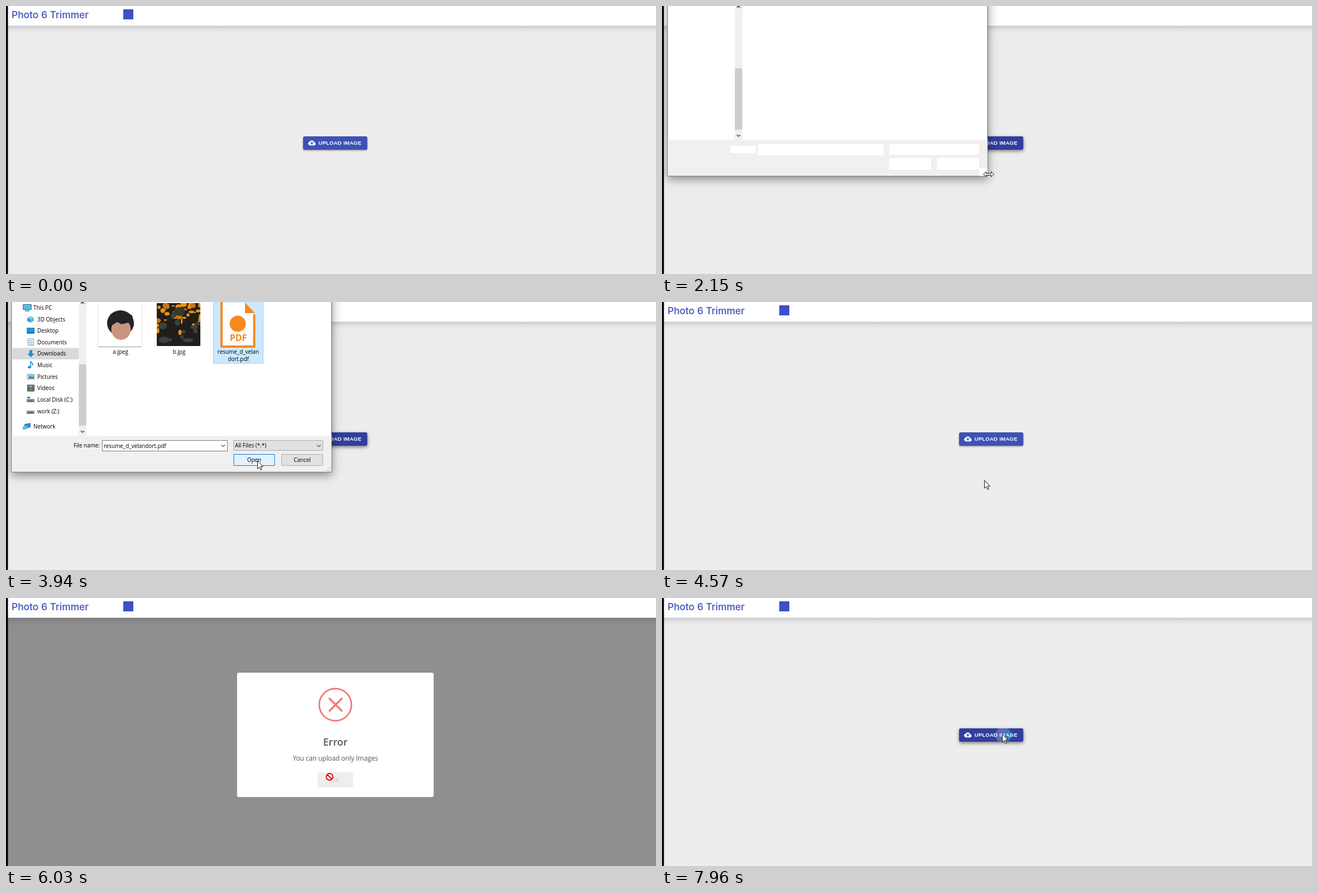
Animation, 1164 px wide and 481 px high, one loop 8000 ms. Source, as an HTML page with a canvas:

```html
<!DOCTYPE html>
<html lang="en">
<head>
<meta charset="utf-8">
<title>Image upload</title>
<style>
html, body { margin: 0; width: 100%; height: 100%; overflow: hidden; background: #ededed; }
canvas { display: block; width: 1164px; height: 481px; }
</style>
</head>
<body>
<canvas id="stage" width="1164" height="481"></canvas>
<script>
const W = 1164, H = 481, LOOP = 8000;
const g = document.getElementById('stage').getContext('2d');
const UI = '"Open Sans", "Noto Sans", sans-serif';
const FILE = ['resume_d_velan', 'dort.pdf'];

const ramp = (t, a, b) => Math.min(1, Math.max(0, (t - a) / (b - a)));
const smooth = p => p * p * (3 - 2 * p);
const mix = (a, b, p) => a + (b - a) * p;
const within = (t, a, b) => t >= a && t < b;
const mixRgb = (a, b, p) => `rgb(${a.map((v, i) => Math.round(mix(v, b[i], p)))})`;

// CSS "ease" timing
function ease(x) {
  let u = x;
  for (let i = 0; i < 8; i++) {
    const f = 3 * u * (1 - u) ** 2 * 0.25 + 3 * u * u * (1 - u) * 0.25 + u ** 3 - x;
    const d = 0.75 * (1 - u) ** 2 + 2.25 * u * u;
    u -= f / d;
  }
  return 3 * u * (1 - u) ** 2 * 0.1 + 3 * u * u * (1 - u) + u ** 3;
}

function saved(draw) { g.save(); draw(); g.restore(); }
function rect(x, y, w, h, fill) { g.fillStyle = fill; g.fillRect(x, y, w, h); }
function frame(x, y, w, h, fill, line, width = 1) {
  rect(x, y, w, h, fill);
  g.strokeStyle = line;
  g.lineWidth = width;
  g.strokeRect(x + width / 2, y + width / 2, w - width, h - width);
}
function round(x, y, w, h, r, fill) {
  g.fillStyle = fill;
  g.beginPath();
  g.roundRect(x, y, w, h, r);
  g.fill();
}
function oval(x, y, rx, ry, fill) {
  g.fillStyle = fill;
  g.beginPath();
  g.ellipse(x, y, rx, ry, 0, 0, Math.PI * 2);
  g.fill();
}
function line(color, width, ...p) {
  g.strokeStyle = color;
  g.lineWidth = width;
  g.beginPath();
  for (let i = 0; i < p.length; i += 2) g.lineTo(p[i], p[i + 1]);
  g.stroke();
}
function poly(fill, ...p) {
  g.fillStyle = fill;
  g.beginPath();
  for (let i = 0; i < p.length; i += 2) g.lineTo(p[i], p[i + 1]);
  g.closePath();
  g.fill();
}
function text(s, x, y, font, color, align = 'left') {
  g.font = font;
  g.fillStyle = color;
  g.textAlign = align;
  g.fillText(s, x, y);
}
const label = (s, x, y, align, color = '#000') => text(s, x, y, `9.9px ${UI}`, color, align);
function shadow(color, blur, dy) {
  g.shadowColor = color;
  g.shadowBlur = blur;
  g.shadowOffsetY = dy;
}

// ---------- page ----------
const cloud = new Path2D('M19.35 10.04C18.67 6.59 15.64 4 12 4 9.11 4 6.6 5.64 5.35 8.04 2.34 8.36 0 10.91 0 14c0 3.31 2.69 6 6 6h13c2.76 0 5-2.24 5-5 0-2.64-2.05-4.78-4.65-4.96zM14 13v4h-4v-4H7l5-5 5 5h-3z');

function ripple(t, start, x, y) {
  const p = ramp(t, start, start + 450);
  if (t < start || p >= 1 && start < 2000) return;
  saved(() => {
    g.beginPath();
    g.roundRect(532, 234, 115, 24, 3);
    g.clip();
    const r = mix(8, 105, ease(p) ** 1.5);
    const fade = start < 2000 ? 1 - ramp(t, start + 250, start + 450) : 1;
    oval(x, y, r, r, `rgba(255,255,255,${0.22 * fade})`);
  });
}

function uploadButton(t) {
  const hover = ramp(t, 740, 990) - ramp(t, 4250, 4500) + ramp(t, 7640, 7890);
  saved(() => {
    shadow(`rgba(0,0,0,${mix(0.4, 0.5, hover)})`, mix(3, 6, hover), mix(1.3, 2.2, hover));
    round(532, 234, 115, 24, 3, mixRgb([63, 81, 181], [48, 63, 159], hover));
  });
  ripple(t, 1060, 601, 248);
  ripple(t, 7900, 611, 246);
  saved(() => {
    g.translate(541, 239);
    g.scale(0.56, 0.56);
    g.fillStyle = '#fff';
    g.fill(cloud);
  });
  g.letterSpacing = '0.27px';
  text('UPLOAD IMAGE', 559.5, 249.2, 'bold 9.5px "Liberation Sans", Arial, sans-serif', '#fff');
  g.letterSpacing = '0px';
}

function header() {
  const fade = g.createLinearGradient(0, 35, 0, 49);
  fade.addColorStop(0, 'rgba(0,0,0,.16)');
  fade.addColorStop(0.45, 'rgba(0,0,0,.05)');
  fade.addColorStop(1, 'rgba(0,0,0,0)');
  rect(0, 35, W, 14, fade);
  rect(0, 0, W, 35.5, '#fff');
  text('Photo 6 Trimmer', 10, 21.7, '500 17.4px Inter, sans-serif', '#3f51b5');
  rect(210, 6, 18, 18, '#3d50c6');
}

// ---------- file dialog ----------
const BLUE = '#1f8ad6';
const disk = y => { round(37, y - 1, 14, 6, 1, '#8b8f93'); rect(39, y + 2, 9, 1, '#3c3f42'); };
const icons = {
  pc(y) { frame(30.5, y - 6, 15, 10, '#53c1ee', '#33617c'); rect(34, y + 5, 8, 1.5, '#4b6a7c'); },
  cube(y) {
    poly('#7fd3f2', 44, y - 6, 50, y - 3, 44, y, 38, y - 3);
    poly('#2f9fc9', 38, y - 3, 44, y, 44, y + 6, 38, y + 3);
    poly('#56bfe4', 50, y - 3, 44, y, 44, y + 6, 50, y + 3);
  },
  desktop(y) { frame(37.5, y - 5, 13.5, 10, '#1c9ce5', '#0d6fb3'); rect(38, y + 3, 12, 1.5, '#0b5b94'); },
  docs(y) {
    frame(39, y - 6.5, 11, 13, '#fff', '#84919a');
    for (let i = 0; i < 3; i++) rect(41, y - 3 + i * 3, 7, 1, '#5d9fc9');
  },
  down(y) { poly(BLUE, 42, y - 6, 47, y - 6, 47, y, 51, y, 44.5, y + 6.5, 38, y, 42, y); },
  music(y) {
    oval(42, y + 4, 2.8, 2.2, BLUE);
    line(BLUE, 1.6, 44.2, y + 4, 44.2, y - 6, 48, y - 2, 47, y + 1);
  },
  pics(y) {
    frame(37.5, y - 5, 14, 10, '#fff', '#9aa3a8');
    rect(39, y - 3.5, 11, 4, '#6cc0ee');
    poly('#3b7c8e', 39, y + 3.5, 43, y - 1, 46, y + 1, 50, y, 50, y + 3.5);
  },
  video(y) {
    rect(38, y - 6, 13, 12, '#33373b');
    rect(41, y - 5, 7, 4.5, '#6aa7d6');
    rect(41, y + 0.5, 7, 4.5, '#8f7d5d');
    for (let i = 0; i < 4; i++) { rect(39, y - 5 + i * 3, 1, 1.5, '#fff'); rect(49, y - 5 + i * 3, 1, 1.5, '#fff'); }
  },
  disk(y) { disk(y); rect(38, y - 5, 5, 3, BLUE); },
  drive: disk,
  net(y) {
    poly('#2e88c9', 33, y - 4, 44, y - 6, 44, y + 2, 33, y + 4);
    poly('#66b9e8', 30, y, 38, y - 1, 38, y + 5, 30, y + 6);
  }
};
const tree = [
  ['This PC', 'pc', 10], ['3D Objects', 'cube', 31], ['Desktop', 'desktop', 51.5],
  ['Documents', 'docs', 72], ['Downloads', 'down', 92.5], ['Music', 'music', 113],
  ['Pictures', 'pics', 134], ['Videos', 'video', 154.5], ['Local Disk (C:)', 'disk', 175],
  ['work (Z:)', 'drive', 196], ['Network', 'net', 223]
];

function sidebar() {
  rect(10, 82.5, 120.5, 20.5, '#d9d9d9');
  for (const [name, icon, y] of tree) {
    icons[icon](y);
    label(name, icon === 'pc' || icon === 'net' ? 49 : 56, y + 3.7);
  }
}

function portrait() {
  saved(() => { shadow('rgba(0,0,0,.3)', 2, 1); rect(165, 2, 78, 77.5, '#fff'); });
  oval(205, 38, 24, 23, '#222326');
  poly('#222326', 182, 36, 187, 22, 206, 15, 226, 24, 229, 42, 224, 52, 187, 52);
  oval(206, 49, 17.5, 19, '#c99580');
  poly('#222326', 186, 44, 189, 30, 222, 30, 226, 45, 219, 37, 207, 40, 199, 36);
}

function abstractPhoto() {
  rect(270, 2, 78, 77, '#211e1b');
  saved(() => {
    g.beginPath();
    g.rect(270, 2, 78, 77);
    g.clip();
    let seed = 11;
    const rnd = () => (seed = seed * 16807 % 2147483647) / 2147483647;
    for (let i = 0; i < 12; i++) oval(270 + rnd() * 78, 20 + rnd() * 60, 3 + rnd() * 7, 2 + rnd() * 5, '#3c423e');
    for (let i = 0; i < 38; i++) {
      const a = rnd() * 78, b = rnd() * rnd() * 60;
      oval(270 + a, 4 + b, 1 + rnd() * 5, 1 + rnd() * 4, i % 3 ? '#e9930f' : '#c97712');
    }
    oval(311, 17, 10, 8, '#39382f');
  });
}

function pdfPage() {
  const o = '#f7891f';
  poly('#fff', 386, 1, 428, 1, 445, 20, 445, 80, 386, 80);
  g.lineJoin = 'round';
  line(o, 4, 428, -2, 386, -2, 386, 80, 444.5, 80, 444.5, 22);
  poly(o, 428, 1, 446, 20, 428, 20);
  oval(415, 39, 14.5, 14.5, o);
  text('PDF', 416, 70, `bold 16px ${UI}`, o, 'center');
}

function chevron(x, y, s = 3.4) { line('#444', 1.1, x - s, y - s / 2, x, y + s / 2, x + s, y - s / 2); }

function files(t) {
  portrait();
  abstractPhoto();
  if (t >= 3030) frame(371, -2, 90, 112.5, '#cce8ff', '#99d1ff');
  else if (t >= 2770) rect(371, -2, 90, 112.5, '#e5f3ff');
  pdfPage();
  label('a.jpeg', 205, 93.2, 'center');
  label('b.jpg', 310, 93.2, 'center');
  label(FILE[0], 416, 93.2, 'center');
  label(FILE[1], 416, 105.8, 'center');
}

function controls(t) {
  label('File name:', 168, 261.3, 'right');
  frame(172, 248, 225, 20, '#fff', '#7a7a7a');
  chevron(389, 258);
  if (t >= 3030) label(FILE.join(''), 175, 261.6);
  else if (t >= 2380 && t < 2900) rect(176, 252, 1, 12, '#000');
  frame(407, 248, 161, 19, '#e1e1e1', '#adadad');
  label('All Files (*.*)', 410, 261.3);
  chevron(560, 258);
  const pressed = within(t, 4000, 4400);
  frame(407.5, 273, 74, 21, pressed ? '#cce4f7' : t >= 3790 ? '#e5f1fb' : '#e1e1e1', pressed ? '#005499' : '#0078d7');
  frame(493, 273, 74.5, 21, '#e1e1e1', '#adadad');
  label('Open', 444.5, 287, 'center');
  label('Cancel', 530.5, 287, 'center');
  for (let i = 0; i < 3; i++)
    for (let j = 0; j <= i; j++) rect(579 - j * 3, 296 + i * 3, 1.5, 1.5, '#bfbfbf');
}

function placeholders() {
  [[122, 251, 46, 13], [172, 248, 225, 20], [407, 248, 161, 19], [407, 273, 75, 21], [493, 273, 75, 21], [568, 291, 15, 14]]
    .forEach(b => rect(...b, '#fff'));
}

function dialog(t) {
  if (!within(t, 1840, 4330)) return;
  const shown = smooth(ramp(t, 1790, 1980)) * (1 - smooth(ramp(t, 4130, 4330)));
  const s = mix(0.94, 1, shown);
  saved(() => {
    g.globalAlpha = shown;
    g.translate(296, 100);
    g.scale(s, s);
    g.translate(-296, -100);
    saved(() => { shadow('rgba(0,0,0,.42)', 16, 5); rect(9.5, -40, 574, 345.5, '#555'); });
    rect(10.3, -40, 572.3, 344.6, '#fff');
    rect(10.3, 240, 572.3, 64.6, '#f0f0f0');
    rect(130.5, -40, 13.5, 280, '#f0f0f0');
    rect(130.5, 112, 13, 110, '#cdcdcd');
    line('#444', 1.5, 134, 3, 137, 0, 140, 3);
    line('#444', 1.5, 134, 231, 137, 234, 140, 231);
    if (t < 2230) return placeholders();
    sidebar();
    files(t);
    controls(t);
  });
}

// ---------- error box ----------
function popScale(t) {
  const p = ramp(t, 4782, 5082);
  if (p < 0.45) return mix(0.7, 1.05, ease(p / 0.45));
  if (p < 0.8) return mix(1.05, 0.95, ease((p - 0.45) / 0.35));
  return mix(0.95, 1, ease((p - 0.8) / 0.2));
}

function errorIcon(t) {
  const p = ramp(t, 4775, 5275), turn = ease(p);
  let size = 0.4, dy = 17, alpha = 0;
  if (p > 0.8) {
    const q = ease((p - 0.8) / 0.2);
    size = mix(1.15, 1, q); dy = mix(-4, 0, q); alpha = 1;
  } else if (p > 0.5) {
    const q = ease((p - 0.5) / 0.3);
    size = mix(0.4, 1.15, q); dy = mix(17, -4, q); alpha = q;
  }
  saved(() => {
    g.globalAlpha *= turn;
    g.translate(589.8, 191.5);
    g.scale(1, Math.max(0.01, Math.cos((1 - turn) * 100 * Math.PI / 180)));
    g.strokeStyle = '#f27474';
    g.lineWidth = 2.7;
    g.beginPath();
    g.arc(0, 0, 28.8, 0, Math.PI * 2);
    g.stroke();
    g.globalAlpha *= alpha;
    g.translate(0.5, dy);
    g.scale(size, size);
    g.lineCap = 'round';
    line('#f27474', 3.2, -11, -11, 11, 11);
    line('#f27474', 3.2, 11, -11, -11, 11);
  });
}

function okButton(t) {
  if (t >= 6010) {
    round(558, 312.7, 63.5, 27, 3, '#eee');
    text('OK', 589.8, 330, `11.3px ${UI}`, '#c4c4c4', 'center');
    return;
  }
  round(555.6, 310.4, 68.3, 31.6, 4.5, 'rgba(50,100,150,.4)');
  round(556.7, 311.4, 66.1, 29.6, 4, '#fff');
  round(558, 312.7, 63.5, 27, 3, t >= 5950 ? '#266aab' : t >= 5110 ? '#2b78c1' : '#3085d6');
  text('OK', 589.8, 330, `11.3px ${UI}`, '#fff', 'center');
}

function errorBox(t) {
  if (!within(t, 4740, 6180)) return;
  const dim = ramp(t, 4740, 4850) * (1 - ramp(t, 6060, 6180));
  rect(0, 35.5, W, H, `rgba(0,0,0,${0.4 * dim})`);
  if (t < 4782) return;
  const out = ease(ramp(t, 6045, 6180));
  const s = popScale(t) * mix(1, 0.5, out);
  saved(() => {
    g.globalAlpha = 1 - out;
    g.translate(589.8, 245.6);
    g.scale(s, s);
    g.translate(-589.8, -245.6);
    round(413.8, 134, 352, 223.2, 3.3, '#fff');
    errorIcon(t);
    text('Error', 589.8, 264.6, `600 18px ${UI}`, '#595959', 'center');
    text('You can upload only Images', 589.8, 292, `11.75px ${UI}`, '#545454', 'center');
    okButton(t);
  });
}

// ---------- pointer ----------
const path = [
  [70, 884, 437], [820, 604, 246], [1060, 601, 247], [1380, 579, 300], [1830, 579, 300], [1840, 585, 302],
  [2340, 585, 302], [2850, 432, 55], [3100, 432, 55], [3790, 446, 272], [3930, 450, 284.5],
  [4200, 450, 285], [4750, 619, 331], [4960, 619, 331], [5550, 579, 321], [6290, 579, 321],
  [6490, 634, 321], [6640, 635, 321], [6780, 635, 321], [6790, 645, 321], [7180, 1042, 437],
  [7560, 634, 276], [7800, 609, 244], [8000, 609, 244]
];
function pointerAt(t) {
  const i = Math.max(1, path.findIndex(k => k[0] >= t));
  const [t0, x0, y0] = path[i - 1], [t1, x1, y1] = path[i];
  const p = smooth(ramp(t, t0, t1));
  return [mix(x0, x1, p), mix(y0, y1, p)];
}

const arrowShape = new Path2D('M.5.5V14.8L3.8 11.7 6.1 17 8.3 16 6 10.8H10.4Z');
const handShape = new Path2D('M-1.5 1Q0-1 1.5 1V7Q3.5 5.5 4.3 7.5 6.3 6.5 7 8.5 9 8 9 10V14L7 18H-2L-6 11.5Q-5.5 9-3.3 11L-1.5 12.5Z');
const resizeShape = new Path2D('M-9.5 0L-4.5-4.5V-1.5H4.5V-4.5L9.5 0 4.5 4.5V1.5H-4.5V4.5Z');

function shape(p) {
  g.lineJoin = 'round';
  g.lineWidth = 1;
  g.fillStyle = '#fff';
  g.strokeStyle = '#111';
  g.fill(p);
  g.stroke(p);
}
function forbidden() {
  for (const [color, width] of [['#fff', 4], ['#d4000f', 2]]) {
    g.strokeStyle = color;
    g.lineWidth = width;
    g.beginPath();
    g.arc(0.5, 0, 6, 0, Math.PI * 2);
    g.moveTo(-3.5, -4);
    g.lineTo(4.5, 4);
    g.stroke();
  }
}
function busyRing(t) {
  g.lineWidth = 3;
  g.strokeStyle = '#1a86d9';
  g.beginPath();
  g.arc(11.3, 1.3, 5, 0, Math.PI * 2);
  g.stroke();
  const a = t / 160;
  g.strokeStyle = '#5ac3f7';
  g.beginPath();
  g.arc(11.3, 1.3, 5, a, a + 1.8);
  g.stroke();
}

function pointer(t) {
  if (t < 70) return;
  saved(() => {
    g.translate(...pointerAt(t));
    if (within(t, 1840, 2380)) return shape(resizeShape);
    if (within(t, 6010, 6100)) return forbidden();
    if (within(t, 780, 1100) || within(t, 5110, 6010) || within(t, 7700, 7900)) return shape(handShape);
    if (within(t, 1100, 1380) || t >= 7900) busyRing(t);
    shape(arrowShape);
  });
}

function draw(now) {
  const t = (now - start) % LOOP;
  rect(0, 0, W, H, '#ededed');
  uploadButton(t);
  header();
  errorBox(t);
  dialog(t);
  rect(0, 0, 3.5, H, '#000');
  pointer(t);
  requestAnimationFrame(now => draw(Math.max(now, start)));
}
const start = performance.now();
draw(start);
</script>
</body>
</html>
```
